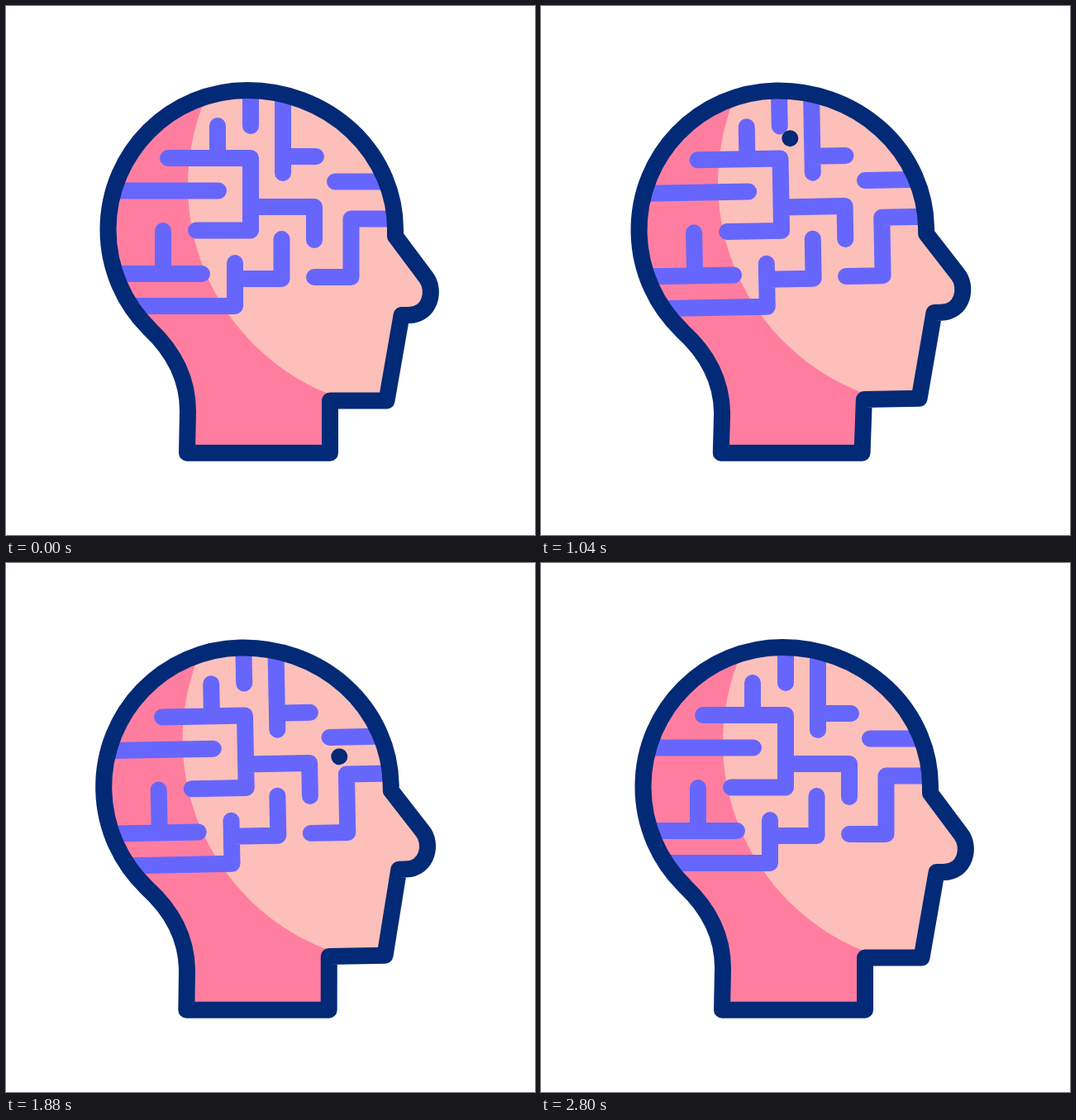
An HTML page with a canvas for the animation above (3 s loop, 640 px wide and 640 px high).

```html
<!DOCTYPE html>
<html lang="en">
<head>
<meta charset="utf-8">
<title>Maze in the mind</title>
<style>
  html, body { margin: 0; width: 100%; height: 100%; overflow: hidden; background: #fff; }
  canvas { display: block; width: 640px; height: 640px; }
</style>
</head>
<body>
<canvas id="stage" width="640" height="640"></canvas>
<script>
const ctx = document.getElementById('stage').getContext('2d');
const LOOP = 3000;
const NAVY = '#032a76', PINK = '#ff7ea0', SKIN = '#fdbfba', VIOLET = '#6766fc';
const PIVOT = { x: 314, y: 540 };

// [time, lean in radians, shift of the left and right base corners]
const POSES = [
  [0, 0, 0, 0],
  [560, 0.1, -2, -6],
  [640, 0.1, -2, -6],
  [1480, -0.154, -0.3, -0.5],
  [1560, -0.154, -0.3, -0.5],
  [2160, 0.089, -1, -2],
  [2800, 0, 0, 0],
  [LOOP, 0, 0, 0]
];

const MAZE = new Path2D(`
  M256 145V184 M196 184H296V271.5H230 M296 243H373V283
  M296 102V145 M335 108V202 M335 182H375
  M135 223.5H257 M190 272V324 M138 324H237
  M155 363H277V311 M277 330H333.5V282
  M373 328H417.5V257.5H470 M464 212.5H398`);

const ROUTE = [[277, 103], [277, 160], [314.5, 160], [314.5, 223], [395, 223], [395, 236], [466, 236]];
const ROUTE_START = 622, ROUTE_END = 2150;

const legs = ROUTE.slice(1).map(([x, y], i) => Math.hypot(x - ROUTE[i][0], y - ROUTE[i][1]));
const routeLength = legs.reduce((a, b) => a + b);
const smooth = p => p * p * (3 - 2 * p);

function poseAt(t) {
  const i = POSES.findIndex(pose => pose[0] > t);
  const from = POSES[i - 1], to = POSES[i];
  const p = smooth((t - from[0]) / (to[0] - from[0]));
  return from.map((v, k) => v + (to[k] - v) * p).slice(1);
}

function pointOnRoute(progress) {
  let rest = progress * routeLength, i = 0;
  while (i < legs.length - 1 && rest > legs[i]) rest -= legs[i++];
  const p = rest / legs[i];
  return ROUTE[i].map((v, k) => v + (ROUTE[i + 1][k] - v) * p);
}

function lean(angle) {
  ctx.translate(PIVOT.x, PIVOT.y);
  ctx.rotate(angle);
  ctx.translate(-PIVOT.x, -PIVOT.y);
}

function fillCircle(x, y, r, color) {
  ctx.beginPath();
  ctx.arc(x, y, r, 0, Math.PI * 2);
  ctx.fillStyle = color;
  ctx.fill();
}

// The head leans while the base of the neck stays on the ground line.
function traceHead(angle, left, right) {
  ctx.beginPath();
  ctx.moveTo(219 + left, 540.7);
  ctx.save();
  lean(angle);
  ctx.lineTo(220, 490);
  ctx.bezierCurveTo(220, 452, 203, 418, 173, 390);
  ctx.arc(292, 270.5, 168.5, Math.PI * 0.75, Math.PI * 1.5);
  ctx.ellipse(292, 270.5, 179, 168.5, 0, -Math.PI / 2, 0);
  ctx.lineTo(471, 278.5);
  ctx.lineTo(508, 328);
  ctx.bezierCurveTo(520, 343, 514, 374, 487, 374);
  ctx.lineTo(478.6, 374);
  ctx.lineTo(460.5 + right / 2, 477.5);
  ctx.lineTo(392, 477.5);
  ctx.restore();
  ctx.lineTo(392 + right, 540.7);
  ctx.closePath();
}

function draw(t) {
  const [angle, left, right] = poseAt(t);
  ctx.clearRect(0, 0, 640, 640);
  ctx.lineWidth = 20;
  ctx.lineCap = ctx.lineJoin = 'round';

  ctx.save();
  traceHead(angle, left, right);
  ctx.fillStyle = PINK;
  ctx.fill();
  ctx.clip();
  lean(angle);
  fillCircle(492, 217, 272, SKIN);
  ctx.strokeStyle = VIOLET;
  ctx.stroke(MAZE);
  if (t > ROUTE_START && t < ROUTE_END) {
    const [x, y] = pointOnRoute((t - ROUTE_START) / (ROUTE_END - ROUTE_START));
    fillCircle(x, y, 10, NAVY);
  }
  ctx.restore();

  traceHead(angle, left, right);
  ctx.strokeStyle = NAVY;
  ctx.stroke();
}

const start = performance.now();
function tick() {
  draw((performance.now() - start) % LOOP);
  requestAnimationFrame(tick);
}
tick();
</script>
</body>
</html>
```
